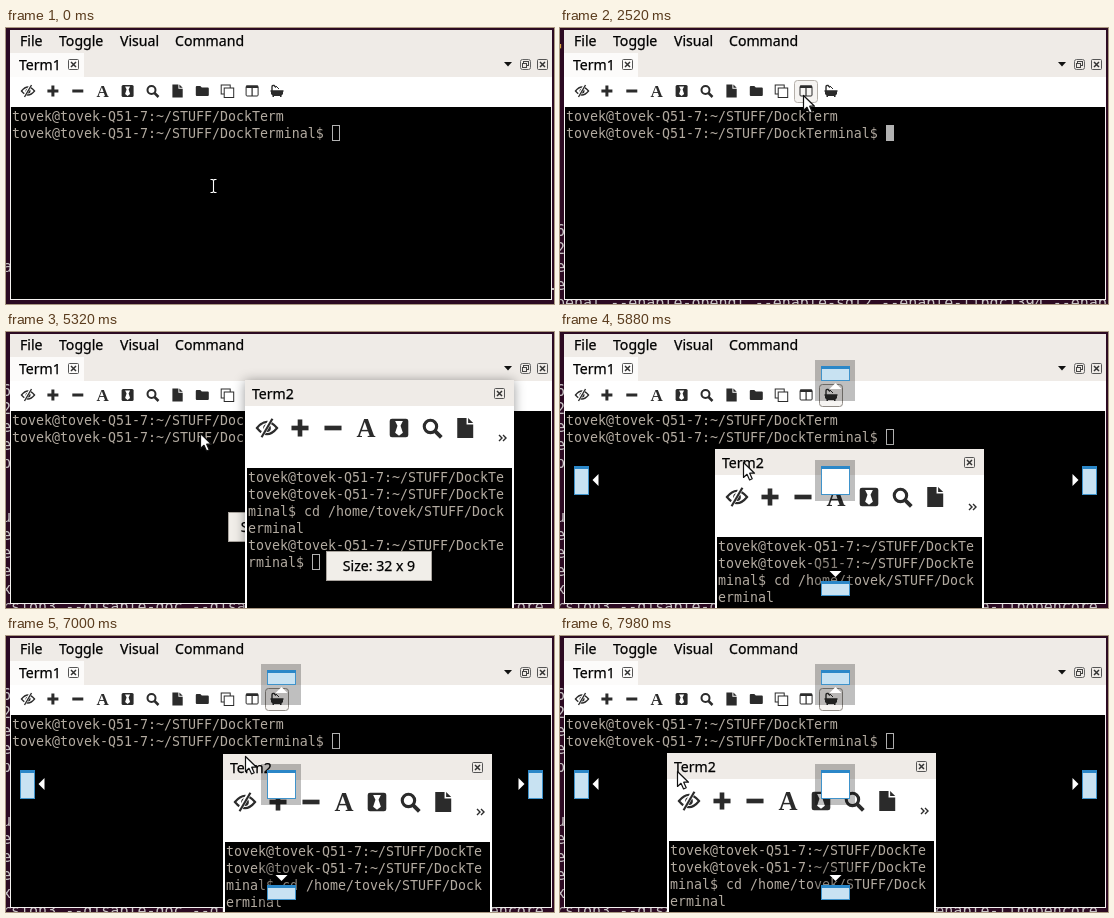
An HTML page for the animation above (8000 ms loop, 548x276 px).

```html
<!DOCTYPE html>
<html lang="en">
<head>
<meta charset="utf-8">
<title>Dock terminal</title>
<style>
html, body { margin: 0; width: 100%; height: 100%; overflow: hidden; background: #2c0a22; }
svg { display: block; width: 548px; height: 276px; }
text { white-space: pre; }
.ui { font: 14.1px "Noto Sans", "Open Sans", sans-serif; fill: #000; stroke: #000; stroke-width: .25px; }
.term { font: 13.29px "DejaVu Sans Mono", monospace; fill: #b2aaa0; }
.back { font: 15px "DejaVu Sans Mono", monospace; fill: #c9c4c6; }
.lifted { filter: drop-shadow(0 1px 6px rgba(0, 0, 0, .4)); }
</style>
</head>
<body>
<svg id="stage" viewBox="0 0 548 276"></svg>
<script>
const LOOP = 8000, STEP = 70;
const BEIGE = '#efebe7', INK = '#2b2b2b';
const PROMPT = 'tovek@tovek-Q51-7:~/STUFF/';

// [time, x, y]
const MOUSE = [
  [0, 207, 158], [560, 207, 158], [840, 243, 67], [3220, 243, 67], [3430, 300, 42],
  [3640, 398, 10], [3780, 381, 0], [3920, 340, 24], [4060, 282, 55], [4130, 282, 55],
  [4270, 298, 40], [4480, 298, 40], [4620, 301, 38], [4690, 301, 38], [4830, 300, 38],
  [5040, 300, 38], [5320, 194, 101], [5670, 165, 125], [5810, 170, 130], [6300, 260, 130],
  [6580, 270, 140], [6720, 270, 140], [7000, 239, 120], [7210, 226, 78], [7490, 270, 29],
  [7700, 270, 29], [7980, 117, 135]
];
const FLOAT = [
  [5040, 273, 25], [5320, 240, 48], [5670, 138, 112], [5810, 143, 117], [6300, 233, 117],
  [6650, 243, 127], [6720, 243, 127], [7000, 218, 118], [7210, 204, 72], [7490, 243, 16],
  [7700, 243, 16], [7980, 108, 117]
];
const LOG = [
  "',", '', '', '', '', '', '', '', '', '',
  '6.3', '2.0', 'en', 'er',
  'penal --enable-opengl --enable-sdl2 --enable-libdc1394 --enab',
  '', '', 'ut', 'en', 'en', 'en', 'x2',
  'rsion3 --disable-doc --disable-programs --enable-libopencore'
];

function at(keys, t) {
  let i = 0;
  while (i < keys.length - 1 && keys[i + 1][0] <= t) i++;
  const a = keys[i], b = keys[i + 1];
  if (!b || t <= a[0]) return [a[1], a[2]];
  const k = (t - a[0]) / (b[0] - a[0]);
  return [1, 2].map(n => Math.round(a[n] + (b[n] - a[n]) * k));
}

const rect = (x, y, w, h, fill, more = '') =>
  `<rect x="${x}" y="${y}" width="${w}" height="${h}" fill="${fill}" ${more}/>`;
const box = (x, y, w, h, stroke, fill = 'none', r = 0) =>
  rect(x + .5, y + .5, w - 1, h - 1, fill, `stroke="${stroke}" rx="${r}"`);
const path = (d, fill, more = '') => `<path d="${d}" fill="${fill}" ${more}/>`;
const line = (d, w, stroke = INK) => path(d, 'none', `stroke="${stroke}" stroke-width="${w}"`);
const text = (cls, x, y, s, more = '') => `<text class="${cls}" x="${x}" y="${y}" ${more}>${s}</text>`;
const move = (x, y, s, scale = 1) => `<g transform="translate(${x} ${y}) scale(${scale})">${s}</g>`;

const ICONS = [
  line('M-6.5 0Q0 -8 6.5 0Q0 8 -6.5 0Z', 1.4) + `<circle r="2.5" fill="${INK}"/>` +
    line('M3 -6L-4 6', 2.8, '#fff') + line('M3.5 -6L-3.5 6', 1.4),
  rect(-5.5, -1.5, 11, 3, INK) + rect(-1.5, -5.5, 3, 11, INK),
  rect(-5.5, -1.5, 11, 3, INK),
  `<text y="5.5" text-anchor="middle" fill="${INK}" style="font:bold 17px 'Liberation Serif',serif">A</text>`,
  rect(-6, -6, 12, 12, INK, 'rx="1.5"') + path('M-2.5 -4.5H2.5L1 -1.5L2.5 3L0 5L-2.5 3L-1 -1.5Z', '#fff'),
  `<circle cx="-1" cy="-1" r="4" fill="none" stroke="${INK}" stroke-width="2"/>` + line('M2 2L6 6', 2.5),
  path('M-5 -6.5H1V-2.2H5.3V6.5H-5Z', INK) + path('M2 -6.5L5.3 -3.2H2Z', INK),
  path('M-6.5 -4Q-6.5 -5 -5.5 -5H-2L-.5 -3.5H5.5Q6.5 -3.5 6.5 -2.5V4Q6.5 5 5.5 5H-5.5Q-6.5 5 -6.5 4Z', INK),
  rect(-6, -6, 9, 9, '#fff', `stroke="${INK}"`) + rect(-3, -3, 9.5, 9.5, '#fff', `stroke="${INK}"`),
  box(-6.5, -5.5, 13, 11, INK, 'none', 1) + rect(-6, -5.5, 12, 2.5, INK) + rect(-.6, -4, 1.2, 9, INK),
  line('M-5 0V-4Q-5 -6 -3 -5.5L-1 -3.5', 1.4) + line('M-1 -5L2 -2', 1) +
    path('M-6.5 -.8H6.5V.8H6V3L4.5 4.5V6H3V5H-3V6H-4.5V4.5L-6 3V.8H-6.5Z', INK)
];

const toolbar = (x, y, gap, count, scale) =>
  ICONS.slice(0, count).map((s, i) => move(x + i * gap, y, s, scale)).join('');
const hover = (i, x, stroke, fill) => box(x - 12, 52, 24, 23, stroke, fill, 3) + move(x, 63, ICONS[i]);
const more = (x, y) => line(`M${x - 4} ${y - 3}l3 3l-3 3M${x} ${y - 3}l3 3l-3 3`, 1.4);
const cross = (x, y) => box(x - 5, y - 5, 11, 11, '#555', 'none', 1) +
  line(`M${x - 2} ${y - 2}l5 5m0 -5l-5 5`, 1.5, '#333');
const restore = (x, y) => box(x - 5, y - 5, 11, 11, '#666', 'none', 2) +
  box(x - 2, y - 3, 6, 5, '#444') + box(x - 3, y - 1, 5, 5, '#444', BEIGE);
const tip = (x, y, s) => box(x, y, 106, 30, '#a9a49e', '#f1eee9') +
  text('ui', x + 53, y + 20, s, 'text-anchor="middle"');

function terminal(x, y, rows, filled) {
  const last = rows.length - 1;
  const cx = x + rows[last].length * 8, cy = y + 2 + last * 17;
  return rows.map((s, i) => text('term', x, y + 14 + i * 17, s)).join('') +
    (filled ? rect(cx, cy - 1, 8, 16, '#b2b2b2') : box(cx, cy - 1, 8, 16, '#b2b2b2'));
}

function pane(x, w, name, rows, filled, split) {
  const r = x + w;
  return rect(x, 25, w, 24, BEIGE) + rect(x, 25, 74, 24, '#fcfbfa') + rect(x, 49, w, 30, '#fff') +
    rect(x + 1, 79, w - 2, 192, '#000') +
    text('ui', x + 9, 42, name) + cross(x + 63, 36) +
    path(`M${r - 48} 34h8l-4 4.5z`, '#111') + restore(r - 27, 36) + cross(r - 10, 36) +
    toolbar(x + 18, 63, 24.9, split ? 9 : 11, 1) + (split ? more(r - 10, 63) : '') +
    terminal(x + 2, 79, rows, filled);
}

function floating(x, y, showTip) {
  const rows = [
    PROMPT + 'DockTe', PROMPT + 'DockTe', 'minal$ cd /home/tovek/STUFF/Dock',
    'erminal', PROMPT + 'DockTe', 'rminal$ '
  ];
  return move(x, y,
    rect(-1, 0, 269, 248, BEIGE, 'class="lifted"') +
    rect(-1, 26, 269, 222, '#fff') + rect(1, 88, 265, 157, '#000') +
    text('ui', 6, 19, 'Term2') + cross(253, 13) +
    toolbar(21, 48, 33, 7, 1.55) + more(257, 58) + terminal(2, 88, rows, false) +
    (showTip ? tip(80, 171, 'Size: 32 x 9') : ''));
}

function target(x, y, w, h, body = '#c8e2f2') {
  return box(x, y, w, h, '#3f93cb', body) + rect(x, y, w, 3, '#2b87c8');
}

function targets() {
  const shade = 'rgba(0,0,0,.25)';
  return [28, 128, 228].map(y => rect(255, y, 40, 41, shade)).join('') +
    rect(8, 128, 40, 41, shade) + rect(502, 128, 40, 41, shade) +
    target(14, 134, 15, 29) + path('M32.5 148l6 -6v12z', '#fff') +
    target(522, 134, 15, 29) + path('M518.5 148l-6 -6v12z', '#fff') +
    target(261, 34, 29, 15) + path('M275.5 51l6 6h-12z', '#fff') +
    target(261, 134, 29, 29, '#fff') +
    target(261, 249, 29, 15) + path('M275.5 245l6 -6h-12z', '#fff');
}

function dropArea([mx, my]) {
  if (mx < 255 || mx > 295) return '';
  const h = my >= 128 && my <= 169 ? 248 : my >= 28 && my <= 69 ? 124 : 0;
  return h ? box(4, 24, 542, h, '#3c8fc8', 'rgba(64,168,240,.25)') : '';
}

function backdrop(t) {
  const top = t >= 2730 ? -121 : 23 + 18 * Math.max(0, (840 - t) / STEP);
  const log = t < 630 ? '' : LOG.map((s, i) => s &&
    text('back', -4, top + 5 + i * 18, s, i ? '' : 'style="fill:#d9a441"')).join('');
  return rect(0, 0, 548, 276, '#2c0a22') + log +
    (t < STEP ? text('back', -3, 244, 'a') + rect(546, 260, 2, 2, '#c9c4c6') : '');
}

function mainWindow(t) {
  const menu = [['File', 14], ['Toggle', 53], ['Visual', 114], ['Command', 169]];
  let s = rect(4, 2, 542, 270, '#f4f2f0') + rect(4, 2, 542, 23, BEIGE) +
    menu.map(([m, x]) => text('ui', x, 18, m)).join('');
  if (t >= 2730 && t < 5040) {
    const ready = t >= 2940;
    const cut = PROMPT + 'DockTer';
    s += rect(273, 25, 4, 247, '#9a9692') +
      pane(4, 269, 'Term1', [cut, cut, 'minal$ '], t < 4760, true) +
      pane(277, 269, 'Term2', ready
        ? [cut, cut, 'minal$ cd /home/tovek/STUFF/DockT', 'erminal', cut, 'minal$ ']
        : [''], false, true);
    if (t >= 2800 && t < 3920) s += tip(85, 180, 'Size: 33 x 11');
  } else {
    s += pane(4, 542, 'Term1', [PROMPT + 'DockTerm', PROMPT + 'DockTerminal$ '],
      t >= 2520 && t < 2730, false);
    if (t >= 840 && t < 2730) s += hover(9, 246, '#b5b0aa', t >= 2590 ? '#dedad5' : '#f6f4f2');
    if (t >= 5040) s += hover(10, 271, '#8f8a85', '#f6f4f2');
    if (t >= 5110 && t < 6160) s += tip(222, 180, 'Size: 67 x 11');
  }
  return s;
}

function pointer(t, [x, y]) {
  if (t < 840) {
    const d = 'M-3 -6.5H-1L0 -5.5L1 -6.5H3M0 -5.5V5.5M-3 6.5H-1L0 5.5L1 6.5H3';
    return move(x + .5, y, line(d, 2.5, '#000') + line(d, 1.1, '#fff'));
  }
  return move(x, y, path('M.5 .5V15.5L4 12.3L6.6 18L9.2 16.8L6.7 11.2H11.5Z', '#fff',
    'stroke="#111" stroke-width="1.2" stroke-linejoin="round"'));
}

function scene(t) {
  const mouse = at(MOUSE, t);
  let s = backdrop(t) + mainWindow(t);
  if (t >= 5040) s += floating(...at(FLOAT, t), t >= 5110 && t < 6160);
  if (t >= 5810) s += targets() + dropArea(mouse);
  return s + pointer(t, mouse);
}

const stage = document.getElementById('stage');
const start = performance.now();
let shown = -1;
function tick() {
  const t = (performance.now() - start) % LOOP;
  const q = Math.floor(t / STEP) * STEP;
  if (q !== shown) stage.innerHTML = scene(shown = q);
  requestAnimationFrame(tick);
}
tick();
</script>
</body>
</html>
```
